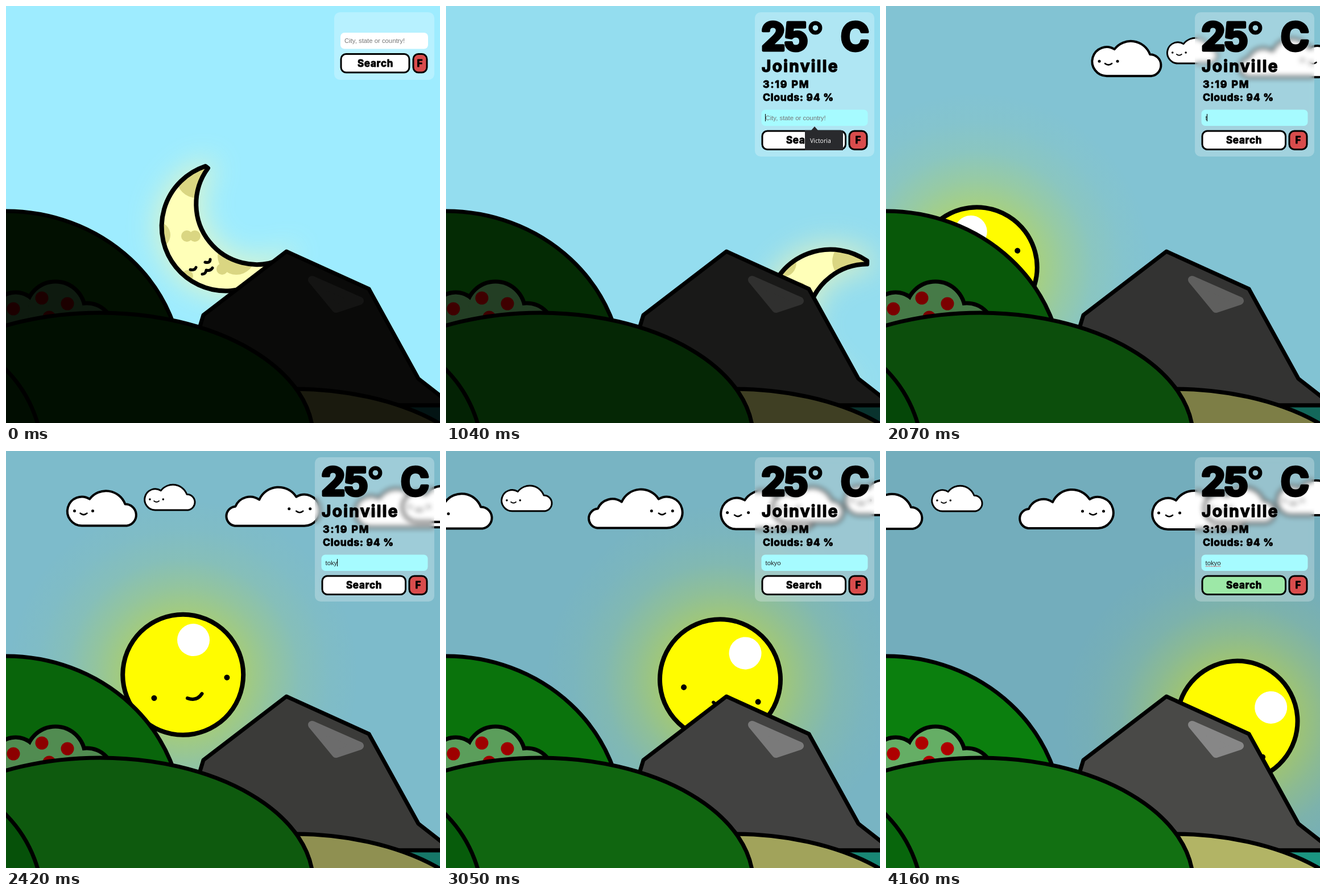
Write an HTML page that moves like this. It is 763x734 px and loops after 4230 ms.

```html
<!DOCTYPE html>
<html lang="en">
<head>
<meta charset="utf-8">
<title>Weather</title>
<style>
html, body { margin: 0; width: 100%; height: 100%; overflow: hidden; }
body { position: relative; background: var(--sky); }
svg { position: absolute; left: 0; top: 0; display: block; }
#panel {
  position: absolute; top: 11px; right: 10px; border-radius: 10px;
  background: rgba(255, 255, 255, .26); backdrop-filter: blur(5px);
}
.ink { fill: none; stroke: #000; stroke-linecap: round; stroke-linejoin: round; }
.land { stroke: #000; stroke-width: 7; stroke-linejoin: round; }
.puff { fill: #fff; stroke: #000; stroke-width: 4; stroke-linejoin: round; }
.fat {
  font-family: Inter, "Open Sans", sans-serif; font-weight: 700;
  stroke: #000; stroke-width: .055em; stroke-linejoin: round;
}
.huge { font-size: 67.4px; stroke-width: .075em; }
.thin { font-weight: 600; stroke-width: 1px; }
.mid { text-anchor: middle; }
.btn { font-size: 17px; letter-spacing: .8px; }
.box { stroke: #000; stroke-width: 3; }
.small { font: 11.33px "Liberation Sans", Arial, sans-serif; }
.hint { fill: #757575; }
</style>
</head>
<body>
<svg id="scene" width="763" height="734" viewBox="0 0 763 734">
  <defs>
    <path id="crescent" d="M350.5 282A112.7 112.7 0 1 0 483.5 446A106.4 106.4 0 0 1 355 285.5Z"/>
    <clipPath id="inMoon"><use href="#crescent"/></clipPath>
    <filter id="soft" x="-60%" y="-60%" width="220%" height="220%"><feGaussianBlur stdDeviation="24"/></filter>
    <radialGradient id="glow">
      <stop offset=".35" stop-color="#d4e018" stop-opacity=".43"/>
      <stop offset=".5" stop-color="#d4e018" stop-opacity=".25"/>
      <stop offset=".66" stop-color="#d4e018" stop-opacity=".1"/>
      <stop offset=".83" stop-color="#d4e018" stop-opacity=".03"/>
      <stop offset="1" stop-color="#d4e018" stop-opacity="0"/>
    </radialGradient>
  </defs>

  <g id="wheel">
    <g id="moon">
      <use href="#crescent" fill="#fffbb0" stroke="#fffbb0" stroke-width="24" opacity=".58" filter="url(#soft)"/>
      <use href="#crescent" fill="#ffffb8"/>
      <g fill="#dad682" clip-path="url(#inMoon)">
        <circle cx="335" cy="303" r="35"/><circle cx="266" cy="403" r="23"/>
        <circle cx="318" cy="405" r="10"/><circle cx="332" cy="405" r="10"/>
        <circle cx="380" cy="463" r="10"/><circle cx="405" cy="440" r="33"/>
        <circle cx="319" cy="475" r="10"/>
      </g>
      <use href="#crescent" class="ink" stroke-width="8"/>
      <path class="ink" stroke-width="5" d="M324 464q8 2 10-4M350 451q9 2 9-5M345 472q6 0 7-7q7 2 11-4"/>
    </g>
    <g transform="rotate(180 379 754.5) translate(379 387.5)">
      <circle r="310" fill="url(#glow)"/>
      <circle r="106" fill="#fffc00" stroke="#000" stroke-width="8"/>
      <circle cx="29.3" cy="-56.8" r="28.5" fill="#fff"/>
      <circle cx="-57.5" cy="31" r="5"/><circle cx="75" cy="19" r="5"/>
      <path class="ink" stroke-width="6" d="M0 42Q15 51 26.5 39"/>
    </g>
  </g>

  <g id="clouds"></g>

  <path class="land" fill="var(--rock)" d="M336 580L347 544L493 432L638 498L725 656L780 699V703H500Z"/>
  <path d="M538 482L622 519L580 533Z" fill="var(--shine)" stroke="var(--shine)" stroke-width="14" stroke-linejoin="round"/>
  <rect class="land" x="600" y="703" width="200" height="60" fill="var(--water)"/>
  <ellipse class="land" cx="0" cy="650" rx="310" ry="289" fill="var(--back)"/>
  <g id="bush"></g>
  <ellipse class="land" cx="505" cy="874" rx="358" ry="200" fill="var(--sand)"/>
  <ellipse class="land" cx="165" cy="760" rx="375" ry="220" fill="var(--front)"/>
  <ellipse class="land" cx="-150" cy="800" rx="215" ry="223" fill="var(--corner)"/>
</svg>

<div id="panel"></div>

<svg width="763" height="734" viewBox="0 0 763 734">
  <g id="empty">
    <rect x="588" y="47" width="154" height="28.5" rx="7" fill="#fff"/>
    <text class="small hint" x="595" y="65">City, state or country!</text>
    <rect class="box" x="589" y="84.5" width="120" height="32.5" rx="9" fill="#fff"/>
    <text class="fat btn mid" x="649.5" y="106.5">Search</text>
    <rect class="box" x="716" y="84.5" width="24" height="32.5" rx="9" fill="#d94c4c"/>
    <text class="fat btn mid" x="728" y="106.5">F</text>
  </g>
  <g id="full">
    <text class="fat huge" x="554" y="77.5" letter-spacing="-2">25</text>
    <text class="fat huge thin" x="634" y="76">°</text>
    <text class="fat huge" x="694" y="77.5">C</text>
    <text class="fat" x="555" y="116" font-size="28" letter-spacing="2.4">Joinville</text>
    <text class="fat" x="557" y="143.5" font-size="18" letter-spacing="1.8">3:19 PM</text>
    <text class="fat" x="557" y="166.5" font-size="17.5" letter-spacing=".8">Clouds: 94 %</text>
    <rect id="field" x="554.5" y="182.5" width="187" height="28.5" rx="7"/>
    <text id="typed" class="small" x="561.5" y="200.5"></text>
    <path id="squiggle" d="M562 203H589" stroke="#e03030" stroke-dasharray="2 1"/>
    <path id="caret" d="M0 190V203" stroke="#000"/>
    <rect id="search" class="box" x="556" y="220" width="146.5" height="32.5" rx="9"/>
    <text class="fat btn mid" x="629.5" y="242">Search</text>
    <rect class="box" x="709" y="220" width="31" height="32.5" rx="9" fill="#d94c4c"/>
    <text class="fat btn mid" x="725" y="242">F</text>
    <g id="tip">
      <path d="M631 219H642L648 212L654 219H698V254H631Z" fill="#292a2d"/>
      <text x="640" y="241" fill="#fff" font-size="10.5" font-family="'Open Sans', 'Noto Sans', sans-serif">Victoria</text>
    </g>
  </g>
</svg>

<script>
const LOOP = 4230, HOLD = 130, STEP = 69.35;
const $ = id => document.getElementById(id);
const show = (id, on) => $(id).style.display = on ? '' : 'none';

// night and day colours
const TINTS = {
  sky: [[158, 236, 255], [114, 171, 186]],
  back: [[2, 16, 1], [11, 130, 14]],
  front: [[1, 15, 1], [18, 115, 18]],
  corner: [[1, 13, 1], [8, 104, 12]],
  bush: [[14, 26, 15], [103, 178, 103]],
  berry: [[28, 0, 0], [178, 0, 0]],
  rock: [[10, 10, 9], [75, 75, 73]],
  shine: [[20, 20, 19], [138, 138, 138]],
  sand: [[26, 26, 14], [182, 184, 103]],
  water: [[3, 20, 20], [28, 152, 132]]
};

const disc = (x, y, r) => `<circle cx="${x}" cy="${y}" r="${r}"/>`;

// inked discs below, plain discs on top, so only the joint outline shows
const leaves = disc(17, 546, 38.5) + disc(142, 570, 43.5) + disc(87, 537, 48.5);
const berries = disc(13, 533, 11.5) + disc(63, 514, 11.5) + disc(108, 524, 11.5) + disc(76, 548, 11.5);
$('bush').innerHTML =
  `<g stroke="#000" stroke-width="14">${leaves}</g>
   <g fill="var(--bush)">${leaves}</g><g fill="var(--berry)">${berries}</g>`;

const face = (x, y, w) =>
  disc(x - w, y, 2.5) + disc(x + w, y, 2.5) +
  `<path class="ink" stroke-width="2.6" d="M${x - 6} ${y + 4}q6 5 12 0"/>`;

const shortPuff = '<path class="puff" d="M28 63A25.5 25.5 0 1 1 41.6 16A36 36 0 0 1 104 25A19.1 19.1 0 0 1 107 63Z"/>';
const longPuff = '<path class="puff" d="M19 70A17.1 17.1 0 0 1 20 36A28 28 0 0 1 62 24A37 37 0 0 1 127 19A27.5 27.5 0 1 1 141 70Z"/>';
const SHORT = shortPuff + face(31, 37, 16);
const LONG = longPuff + face(133, 40, 18.5);
const FLIP = `<g transform="matrix(-1 0 0 1 172 0)">${longPuff}</g>` + face(33, 41, 18.5);

// shape, resting place, scale, share of the drift, rise per drifted pixel
const CLOUDS = [
  [SHORT, -60, 74, 1, 1, .033],
  [SHORT, 79, 60, .73, .985, .012],
  [LONG, 231, 66, 1, .92, .028],
  [FLIP, 465, 68, 1, .88, .025],
  [SHORT, 557, 62, 1.03, .83, .015],
  [SHORT, 685, 50, 1, .8, .015]
];
$('clouds').innerHTML = CLOUDS.map(c => `<g>${c[0]}</g>`).join('');
const cloudNodes = [...$('clouds').children];

const KEYS = [1940, 2080, 2220, 2350, 2500];
const FOCUS = 690;

// cubic-bezier(.25, .1, .25, 1)
function ease(x) {
  if (x <= 0) return 0;
  if (x >= 1) return 1;
  const curve = (s, a, b) => 3 * s * (1 - s) ** 2 * a + 3 * s * s * (1 - s) * b + s ** 3;
  let lo = 0, hi = 1;
  for (let i = 0; i < 24; i++) {
    const m = (lo + hi) / 2;
    if (curve(m, .25, .25) < x) lo = m; else hi = m;
  }
  return curve(lo, .1, 1);
}

function drawScene(t) {
  const e = ease((t - 165) / 5000);
  for (const [name, [a, b]] of Object.entries(TINTS)) {
    const rgb = a.map((v, i) => Math.round(v + (b[i] - v) * e));
    document.body.style.setProperty('--' + name, `rgb(${rgb})`);
  }
  $('wheel').setAttribute('transform', `rotate(${226.2 * e} 379 754.5)`);

  const drift = 85 * Math.max(0, 3.65 - t / 1000) ** 3.2;
  CLOUDS.forEach(([, x, y, s, share, rise], i) => {
    const d = drift * share;
    cloudNodes[i].setAttribute('transform', `translate(${x + d} ${y - d * rise}) scale(${s})`);
  });
}

function drawPanel(t) {
  const full = t >= 195;
  show('empty', !full);
  show('full', full);
  const panel = $('panel').style;
  panel.width = full ? '210px' : '176px';
  panel.height = full ? '254px' : '119px';

  const focused = t >= FOCUS;
  $('field').setAttribute('fill', focused ? '#a6fbff' : '#fff');
  const count = KEYS.filter(k => t >= k).length;
  const typed = $('typed');
  typed.textContent = count ? 'tokyo'.slice(0, count) : 'City, state or country!';
  typed.setAttribute('fill', count ? '#222' : '#757575');

  const since = t - (count ? KEYS[count - 1] : FOCUS);
  show('caret', focused && since % 1000 < 500);
  const end = count && full ? typed.getComputedTextLength() : 0;
  $('caret').setAttribute('transform', `translate(${Math.floor(561.5 + end) + .5} 0)`);

  show('squiggle', t >= 3300);
  show('tip', t >= 900 && t < KEYS[0]);
  $('search').setAttribute('fill', t >= 3950 ? '#9de8a7' : '#fff');
}

function frame(now) {
  const raw = now % LOOP;
  const t = raw < HOLD ? 0 : HOLD + Math.floor((raw - HOLD) / STEP) * STEP;
  drawScene(t);
  drawPanel(t);
  requestAnimationFrame(frame);
}
frame(0);
</script>
</body>
</html>
```
